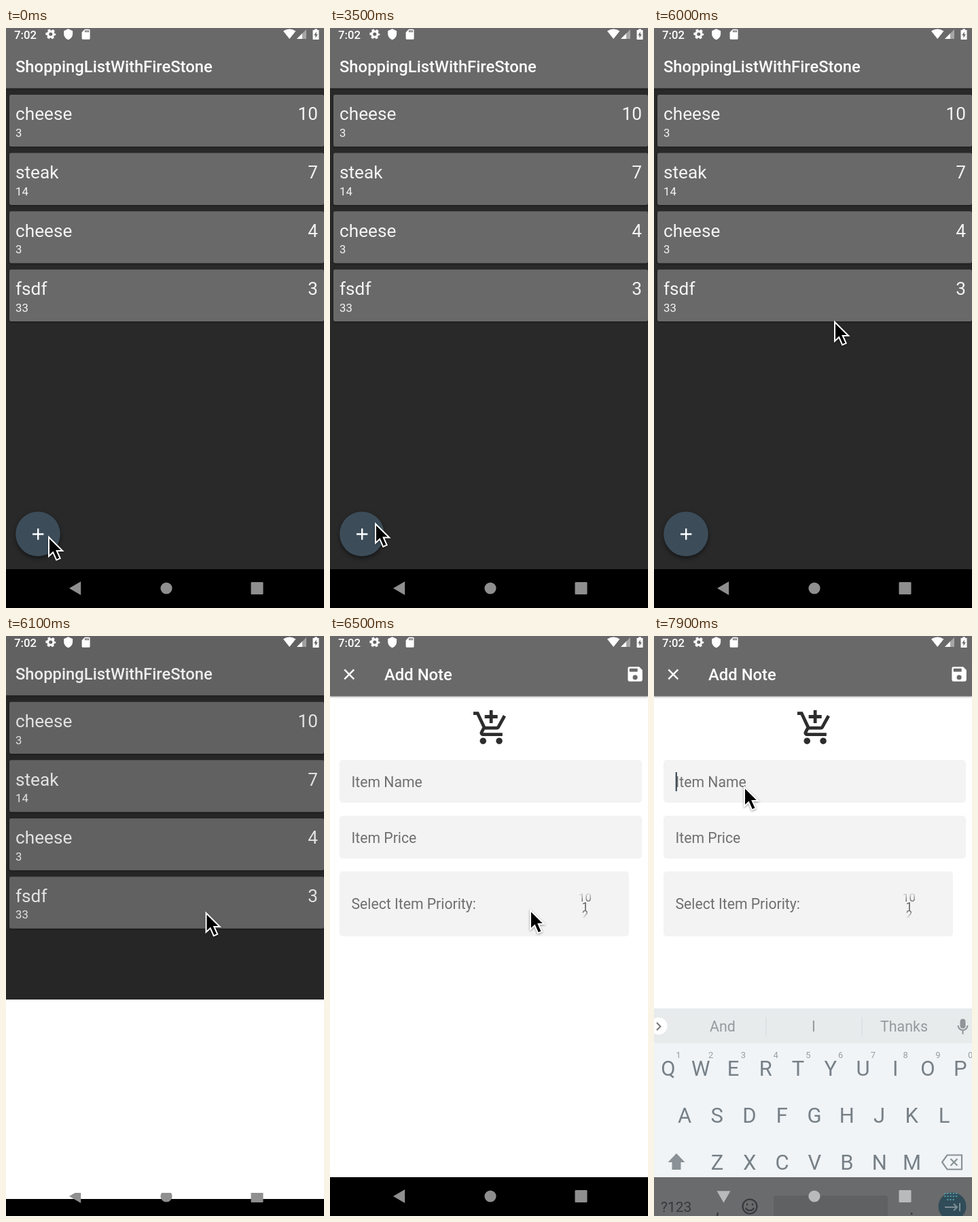
An HTML page that plays this animation: 468x852 px, repeating every 8 s.

```html
<!DOCTYPE html>
<html lang="en">
<head>
<meta charset="utf-8">
<title>Shopping list</title>
<style>
html, body { margin: 0; width: 100%; height: 100%; overflow: hidden; background: #000; }
svg { display: block; width: 468px; height: 852px; }
text { font-family: Roboto, sans-serif; white-space: pre; }
.title { font-size: 23.8px; font-weight: 500; fill: #fff; }
.item { font-size: 26.2px; fill: #f4f4f4; }
.small { font-size: 16.7px; fill: #f4f4f4; }
.field { font-size: 21.2px; fill: #6f6f6f; }
.bar { fill: #696969; filter: drop-shadow(0 1.5px 1.5px #0005); }
.card { fill: #696969; filter: drop-shadow(0 1px 1px #0006); }
.mid { text-anchor: middle; }
.end { text-anchor: end; }
.key { font-size: 31px; fill: #778087; }
.hint { font-size: 13px; fill: #969da2; }
.word { font-size: 21.4px; fill: #96999b; }
</style>
</head>
<body>
<svg viewBox="0 0 468 852">
  <defs>
    <clipPath id="reveal"><rect id="revealRect" width="468" height="852"/></clipPath>
    <clipPath id="iconClip"><rect id="iconRect" width="468" height="852"/></clipPath>
    <linearGradient id="fade" gradientUnits="userSpaceOnUse" x1="0" y1="377" x2="0" y2="414">
      <stop stop-color="#fff" stop-opacity=".1"/>
      <stop offset=".4" stop-color="#fff"/>
      <stop offset=".68" stop-color="#fff"/>
      <stop offset="1" stop-color="#fff" stop-opacity=".15"/>
    </linearGradient>
    <mask id="pickerMask" maskUnits="userSpaceOnUse" x="350" y="377" width="50" height="37">
      <rect x="350" y="377" width="50" height="37" fill="url(#fade)"/>
    </mask>
  </defs>

  <rect width="468" height="852"/>
  <g id="list">
    <rect y="-20" width="468" height="835" fill="#292929"/>
    <rect class="bar" y="-20" width="468" height="108.5"/>
    <text class="title" x="14" y="65">ShoppingListWithFireStone</text>
    <g id="cards"></g>
    <circle id="fab" cx="47" cy="743.3" r="32.8" fill="#3c4d59" style="filter:drop-shadow(0 3px 3px #0007)"/>
    <circle id="ripple" cx="47" cy="743.3" r="32.8" fill="#88939b"/>
    <path d="M39 743.5h16.4M47.2 735.3v16.4" stroke="#fff" stroke-width="2.4"/>
  </g>
  <rect y="795" width="468" height="57"/>

  <g clip-path="url(#reveal)">
    <g id="form">
      <rect width="468" height="795" fill="#fff"/>
      <rect class="bar" width="468" height="88.5"/>
      <path d="M21.3 49.3l14 14m0-14l-14 14" stroke="#fff" stroke-width="2.4"/>
      <text class="title" x="80" y="65">Add Note</text>
      <path fill="#fff" transform="translate(434.8 41.7) scale(1.19)" fill-rule="evenodd" d="M17 3H5a2 2 0 0 0-2 2v14c0 1.1.9 2 2 2h14a2 2 0 0 0 2-2V7zM12 19a3 3 0 1 1 0-6 3 3 0 0 1 0 6zM15 9H5V5h10z"/>
      <path fill="#2d2d2d" transform="translate(208.6 106.6) scale(2.38)" d="M11 9h2V6h3V4h-3V1h-2v3H8v2h3zM7 18a2 2 0 1 0 0 4 2 2 0 0 0 0-4zM17 18a2 2 0 1 0 0 4 2 2 0 0 0 0-4zM7.17 14.75l.03-.12.9-1.63h7.45c.75 0 1.41-.41 1.75-1.03l3.86-7.01L19.42 4l-3.87 7H8.53L4.27 2H1v2h2l3.6 7.59-1.35 2.45C4.5 15.3 5.4 17 7 17h12v-2H7.42a.25.25 0 0 1-.25-.25z"/>
      <g fill="#f3f3f3">
        <rect x="14" y="182" width="445" height="63" rx="5"/>
        <rect x="14" y="264" width="445" height="63" rx="5"/>
        <rect x="14" y="345.7" width="426" height="95.5" rx="5"/>
      </g>
      <text class="field" x="31.5" y="222">Item Name</text>
      <text class="field" x="31.5" y="304">Item Price</text>
      <text class="field" x="31.5" y="400.5">Select Item Priority:</text>
      <g class="mid" mask="url(#pickerMask)" font-size="16.7" fill="#555">
        <text x="375.5" y="390">10</text>
        <text x="375.5" y="403.3">1</text>
        <text x="375.5" y="415">2</text>
      </g>
      <path id="caret" d="M32.8 200v28" stroke="#3c4d59" stroke-width="2.2"/>
    </g>
  </g>

  <g id="keyboard">
    <rect y="547" width="468" height="248" fill="#f0f4f7"/>
    <rect y="547" width="468" height="51" fill="#e8ebec"/>
    <path d="M165 560v28M306 560v28" stroke="#d5d9db"/>
    <circle cx="7" cy="573" r="12.5" fill="#fff"/>
    <path d="M4 568l5.500 5.500-5.500 5.500" fill="none" stroke="#777" stroke-width="2"/>
    <g fill="none" stroke="#8f9598" stroke-width="2">
      <rect x="451.500" y="563.500" width="6" height="12" rx="3" fill="#8f9598"/>
      <path d="M447.500 572a7 7 0 0 0 14 0M454.500 579v6"/>
    </g>
    <g id="keys"></g>
    <path d="M33 760l12.500 13h-6v11h-13v-11h-6z" fill="#8a9297"/>
    <path d="M424 773l7.500-10.500h21.500v21h-21.500zM436.500 768l10 10m0-10l-10 10" fill="none" stroke="#8a9297" stroke-width="2.200"/>
    <rect y="795" width="468" height="57" fill="#6a6b6c"/>
    <rect x="176" y="822" width="168" height="36" rx="4" fill="#5f6163"/>
    <text x="10" y="846" font-size="21" fill="#35393c">?123</text>
    <text x="91" y="850" font-size="25" fill="#35393c">,</text>
    <text x="376" y="850" font-size="25" fill="#35393c">.</text>
    <g fill="none" stroke="#35393c" stroke-width="2.200">
      <circle cx="141" cy="838" r="10.500"/>
      <path d="M135 840a6.500 6.500 0 0 0 12 0M137 833.500v3M145 833.500v3"/>
    </g>
    <circle cx="439" cy="838" r="20.500" fill="#2f4c58"/>
    <path d="M428 839h18m-5-5l5 5-5 5M450 833v12" fill="none" stroke="#7d8f97" stroke-width="2"/>
  </g>

  <g id="nav" clip-path="url(#iconClip)">
    <path id="back" d="M93 823l17.200-10v20z"/>
    <circle cx="236" cy="823" r="8.600"/>
    <rect x="360.500" y="814" width="18" height="18" rx="1"/>
    <path id="imeIcon" d="M427 819h20M427 823h20M431 828h12" fill="none" stroke="#4f8f9b" stroke-width="2.200" stroke-dasharray="2.500 1.700"/>
  </g>

  <g fill="#fff">
    <text x="12" y="15.500" font-size="16.700" font-weight="500">7:02</text>
    <g transform="translate(65.800 9)">
      <circle r="4.200" fill="none" stroke="#fff" stroke-width="3.200"/>
      <circle r="6" fill="none" stroke="#fff" stroke-width="3" stroke-dasharray="3.400 2.883" stroke-dashoffset="1.700"/>
    </g>
    <path transform="translate(83 .600) scale(.72)" d="M12 1 3 5v6c0 5.550 3.840 10.740 9 12 5.160-1.260 9-6.450 9-12V5z"/>
    <path transform="translate(108.600 .200) scale(.75)" fill-rule="evenodd" d="M18 2h-8L4 8v12c0 1.100.900 2 2 2h12a2 2 0 0 0 2-2V4a2 2 0 0 0-2-2zM12 8h-2V4h2zM15 8h-2V4h2zM18 8h-2V4h2z"/>
    <path d="M408 4.500q9.200-6 18.400 0L417.200 16z"/>
    <path d="M442 2v14h-14z" opacity=".4"/>
    <path d="M436 8v8h-8z"/>
    <path fill-rule="evenodd" d="M454 1.500h4V3h2.500v14h-9V3h2.500zM456.700 5.500l-3.500 5.200h2.200v4l3.500-5.500h-2.200z"/>
  </g>

  <circle id="press" r="43" fill="none" stroke="#000" stroke-width="3"/>
  <path id="cursor" d="M1 2v28l6.200-5.800 5 11.300 5.500-2.400-5-11.100h8.500z" stroke="#fff" stroke-width="2" style="filter:drop-shadow(0 1px 1.500px #0006)"/>
</svg>
<script>
const $ = id => document.getElementById(id);
const text = (cls, x, y, s) => `<text class="${cls}" x="${x}" y="${y}">${s}</text>`;

$('cards').innerHTML = [['cheese', 3, 10], ['steak', 14, 7], ['cheese', 3, 4], ['fsdf', 33, 3]]
  .map(([name, price, priority], i) => {
    const y = 98 + i * 85.6;
    return `<rect class="card" x="5" y="${y}" width="463" height="76.300" rx="2.400"/>` +
      text('item', 14, y + 37.3, name) + text('small', 14, y + 62, price) +
      text('item end', 459, y + 37.3, priority);
  }).join('');

const keyRow = (letters, x, y) =>
  [...letters].map((c, i) => text('key mid', x + i * 47.75, y, c)).join('');
$('keys').innerHTML =
  keyRow('QWERTYUIOP', 21, 646) + keyRow('ASDFGHJKL', 45, 715) + keyRow('ZXCVBNM', 93, 784) +
  [...'1234567890'].map((c, i) => text('hint mid', 36 + i * 47.75, 620, c)).join('') +
  text('word mid', 101, 581, 'And') + text('word mid', 235, 581, 'I') + text('word mid', 368, 581, 'Thanks');

// Keys are [time, value, ...]; values between them are linear.
function track(keys, t) {
  const n = keys.findIndex(k => k[0] > t);
  if (n === 0) return keys[0].slice(1);
  if (n < 0) return keys[keys.length - 1].slice(1);
  const a = keys[n - 1], b = keys[n], p = (t - a[0]) / (b[0] - a[0]);
  return a.slice(1).map((v, i) => v + (b[i + 1] - v) * p);
}

const pointer = [
  [800, 62, 746], [900, 69, 740], [1000, 82, 728], [1100, 91, 720], [1200, 95, 719],
  [2900, 95, 719], [3100, 88, 720], [3300, 73, 725], [3500, 66, 726.5],
  [3900, 66, 726.5], [4100, 65, 727.5], [4300, 65, 727.5], [4700, 56, 728],
  [5600, 56, 728], [5700, 70, 705], [5800, 120, 620], [5900, 190, 520], [6000, 265, 430],
  [6100, 293.5, 405], [6200, 294.5, 406], [6500, 294, 401],
  [6600, 282, 386], [6800, 210, 300], [7000, 140, 228], [7100, 132, 220]
];
const glow = [[4800, 0], [5000, .6], [5200, 1], [5300, .7], [5400, .35], [5500, 0]];
const listMove = [[6000, 0, 1], [6100, -1.3, .93], [6200, -13, .88], [6300, -27, .88]];
const formTop = [[6000, 852], [6100, 534], [6200, 55], [6300, 10], [6400, 1], [6500, 0]];
const formShift = [[6000, 35], [6100, 32], [6200, 10], [6300, 3], [6400, 1], [6500, 0]];

const show = (id, on) => $(id).style.display = on ? '' : 'none';

function draw(now) {
  const t = Math.floor(now % 8000 / 100) * 100;
  const [x, y] = track(pointer, t);
  $('cursor').setAttribute('transform', `translate(${x} ${y})`);
  $('press').setAttribute('transform', `translate(${x - .8} ${y + 3})`);
  show('press', t >= 4800 && t < 5100 || t >= 7100 && t < 7300);

  $('ripple').setAttribute('opacity', track(glow, t)[0]);
  const [listY, alpha] = track(listMove, t);
  $('list').setAttribute('transform', `translate(0 ${listY})`);
  $('list').setAttribute('opacity', alpha);

  const [shift] = track(formShift, t);
  $('form').setAttribute('transform', `translate(0 ${shift})`);
  $('revealRect').setAttribute('y', track(formTop, t)[0]);
  $('iconRect').setAttribute('y', t > 6000 ? 786 + shift : 0);

  const typing = t >= 7700, keyboard = t >= 7900;
  show('caret', t >= 7400);
  show('imeIcon', typing);
  show('keyboard', keyboard);
  $('back').setAttribute('transform', typing ? 'rotate(-90 102.5 823)' : '');
  $('nav').setAttribute('fill', keyboard ? '#b9babb' : '#8f8f8f');
  requestAnimationFrame(draw);
}
const start = performance.now();
const tick = draw;
draw = () => tick(performance.now() - start);
draw();
</script>
</body>
</html>
```
